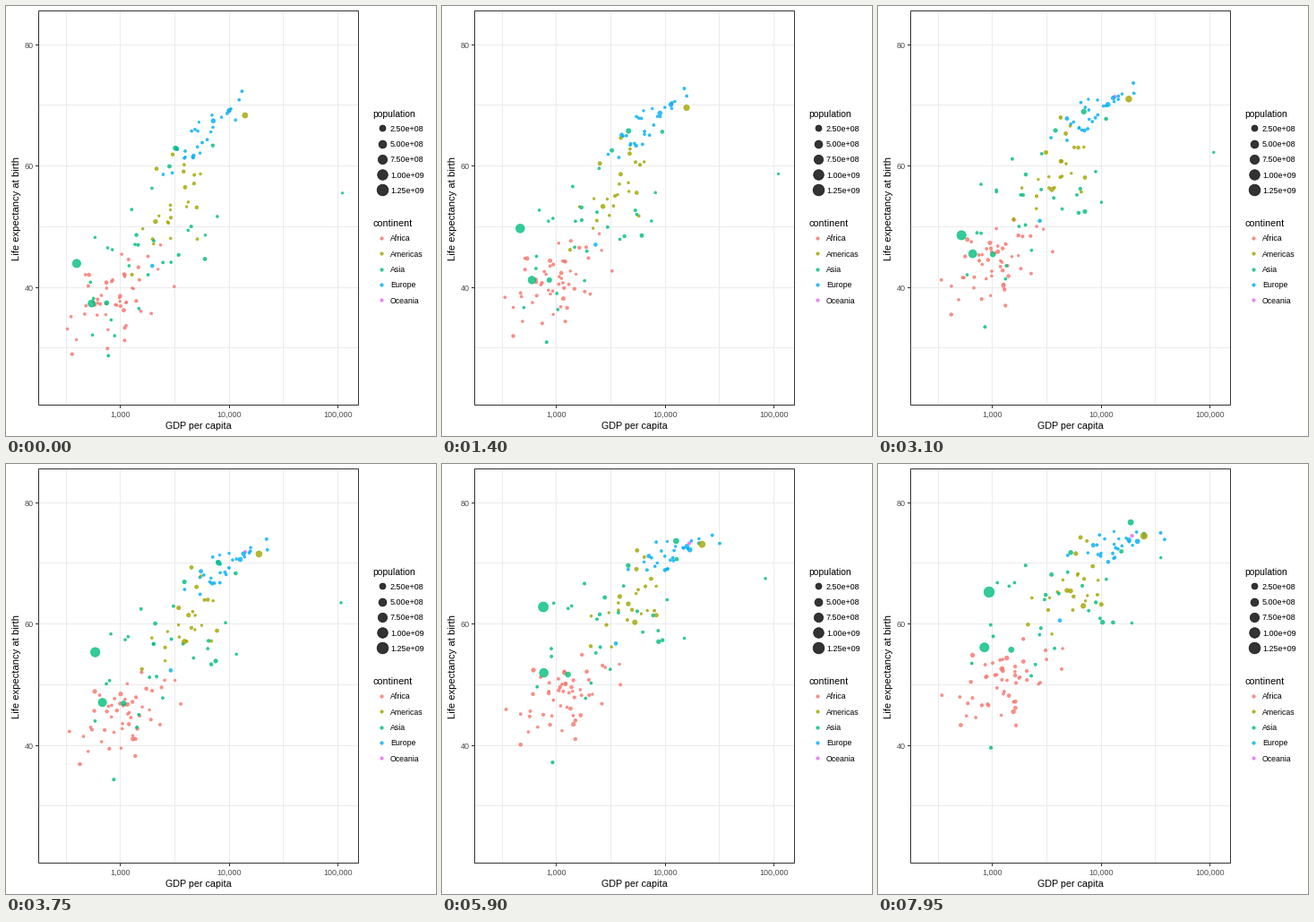
A matplotlib script that plays this animation: 480x480 px, repeating every 8 s.

```python
import numpy as np
import matplotlib.pyplot as plt
from matplotlib.animation import FuncAnimation
from matplotlib.patches import Rectangle

SIZE, DPI = 480, 96
PT = 72 / DPI
FRAMES, STEP = 160, 50
KEYS = np.round(np.arange(7) * 299 / 11)    # one key every five years
PROGRESS = np.linspace(0, 1, len(KEYS))
CEILING = 78                                # life expectancy all groups approach

COLORS = {"Africa": "#F8766D", "Americas": "#A3A500", "Asia": "#00BF7D",
          "Europe": "#00B0F6", "Oceania": "#E76BF3"}

# count, mean log gdp, spread, its gain, mean life, rise per spread, scatter,
# share of the gap to the ceiling that is closed
CROWD = {
    "Africa": (51, 3.02, 0.25, 0.17, 39, 1.2, 4.3, 0.31),
    "Americas": (23, 3.50, 0.20, 0.27, 53, 3.5, 5.0, 0.52),
    "Asia": (27, 3.20, 0.36, 0.36, 46, 4.8, 5.5, 0.50),
    "Europe": (27, 3.74, 0.19, 0.40, 65, 3.2, 1.7, 0.64),
}

# Largest and outlying dots: gdp and life at start and end, millions at start
MAIN = [
    ("Oceania", 10040, 69.1, 19477, 74.7, 9),
    ("Africa", 1077, 36.3, 1577, 45.8, 33),
    ("Americas", 13990, 68.4, 25010, 74.7, 158),
    ("Americas", 2109, 50.9, 7031, 63.3, 57),
    ("Asia", 547, 37.4, 856, 56.6, 372),
    ("Asia", 3217, 63.0, 19384, 77.1, 86),
    ("Asia", 750, 37.5, 1517, 56.2, 82),
    ("Asia", 779, 28.8, 978, 39.9, 8),
    ("Europe", 7144, 67.5, 22032, 73.8, 69),
    ("Europe", 9980, 69.2, 18232, 74.0, 50),
    ("Europe", 1969, 43.6, 4241, 61.0, 22),
]

rng = np.random.default_rng(7)


def path(start, end, bend=0.2):
    """Values at every key, one row per key; bend > 0 rises early."""
    p = PROGRESS + bend * PROGRESS * (1 - PROGRESS)
    return start + np.outer(p, np.subtract(end, start))


def scores(n):
    return np.clip(rng.normal(size=n), -1.9, 1.9)


def growth(continent):
    return 1.2 if continent == "Europe" else 1.9


def crowd(name):
    n, mean, spread, gain, life, rise, scatter, share = CROWD[name]
    u = scores(n)
    x0 = mean + spread * u
    y0 = life + rise * u + scatter * scores(n)
    x1 = x0 + gain + 0.35 * spread * scores(n)
    y1 = y0 + share * (CEILING - y0) + 0.5 * scatter * scores(n)
    x = path(x0, x1) + rng.normal(0, 0.018, (len(KEYS), n))
    y = path(y0, y1, 0.4) + rng.normal(0, 0.25, (len(KEYS), n))
    pop = 4 * np.exp(1.1 * scores(n))
    return x, y, path(pop, pop * growth(name)), [COLORS[name]] * n


def main_dot(name, g0, l0, g1, l1, pop):
    return (path(np.log10([g0]), np.log10([g1])), path([l0], [l1]),
            path([pop], [pop * growth(name)]), [COLORS[name]])


def giant():
    """The most populous dot: an early rise broken by a sharp dip."""
    x = path([2.60], [2.98], 0.1)
    y = path([44.0], [65.5], 0.8)
    x[2] -= 0.05
    y[2] -= 10.5
    return x, y, path([556], [1000], 0), [COLORS["Asia"]]


def oil_state():
    """The richest dot: steady at first, then falling fast."""
    x = 5.04 - 0.54 * PROGRESS[:, None] ** 5
    return x, path([55.6], [71.3]), path([0.2], [1.5]), [COLORS["Asia"]]


def to_px(log_gdp, life):
    return 127.5 + 121.6 * (log_gdp - 3), 314.5 - 6.775 * (life - 40)


def area(size):
    """Marker area in square points for a size in millimetres."""
    return ((0.75 * (2.845 * size + 0.945) - 0.5) * PT) ** 2


def pop_size(millions):
    return 1 + 5 * np.sqrt(np.asarray(millions) / 1319)


fig = plt.figure(figsize=(SIZE / DPI, SIZE / DPI), dpi=DPI, facecolor="white")
ax = fig.add_axes([0, 0, 1, 1])
ax.set_xlim(0, SIZE)
ax.set_ylim(SIZE, 0)
ax.axis("off")


def label(x, y, text, px=9, color="black", ha="left", va="center_baseline", **kw):
    ax.text(x, y, text, fontsize=px * PT, color=color, ha=ha, va=va,
            family="Liberation Sans", **kw)


def line(xs, ys, color):
    ax.plot(xs, ys, color=color, lw=PT, solid_capstyle="butt", zorder=1, snap=False)


def dots(x, y, size, color):
    return ax.scatter(x, y, s=area(size), c=color, edgecolors=color, alpha=0.8,
                      linewidths=0.7 * PT, zorder=3, snap=False)


# Panel
for x in (67.5, 127.5, 188.5, 249.5, 309.5, 370.5):
    line([x, x], [6, 445], "#EBEBEB")
for y in (43.5, 110.5, 178.5, 246.5, 314.5, 381.5):
    line([37, 393], [y, y], "#EBEBEB")
ax.add_patch(Rectangle((36.5, 5.5), 357, 440, fill=False, ec="#333333", lw=PT,
                       zorder=5, snap=False))

for x, text in ((127.5, "1,000"), (249.5, "10,000"), (370.5, "100,000")):
    line([x, x], [446, 449], "#333333")
    label(x, 455, text, color="#4D4D4D", ha="center")
for y, text in ((43.5, "80"), (178.5, "60"), (314.5, "40")):
    line([33, 36], [y, y], "#333333")
    label(31, y, text, color="#4D4D4D", ha="right")
label(215, 468, "GDP per capita", 10.7, ha="center")
label(12.5, 226, "Life expectancy at birth", 11.2, ha="center", va="center", rotation=90)

# Legends
label(409.7, 119.5, "population", 10.4)
for i, text in enumerate(("2.50e+08", "5.00e+08", "7.50e+08", "1.00e+09", "1.25e+09")):
    y = 136.3 + 17.28 * i
    dots(419.5, y, pop_size(250 * (i + 1)), "black")
    label(429, y, text)
label(409.7, 241.5, "continent", 10.7)
for i, (name, color) in enumerate(COLORS.items()):
    y = 259 + 17.28 * i
    dots(418.8, y, 1.5, color)
    label(429, y, name, 8.8)

groups = ([main_dot(*MAIN[0])] + [crowd(name) for name in CROWD]
          + [main_dot(*row) for row in MAIN[1:]] + [giant(), oil_state()])
LOG_GDP, LIFE, POP = (np.hstack(part) for part in list(zip(*groups))[:3])
hues = [color for group in groups for color in group[3]]
cloud = dots(*to_px(LOG_GDP[0], LIFE[0]), pop_size(POP[0]), hues)


def draw(i):
    k = np.searchsorted(KEYS, i, side="right") - 1
    f = (i - KEYS[k]) / (KEYS[k + 1] - KEYS[k])

    def between(a):
        return a[k] + f * (a[k + 1] - a[k])

    cloud.set_offsets(np.column_stack(to_px(between(LOG_GDP), between(LIFE))))
    cloud.set_sizes(area(pop_size(between(POP))))
    return (cloud,)


anim = FuncAnimation(fig, draw, frames=FRAMES, interval=STEP, repeat=True,
                     repeat_delay=0, blit=False)
plt.show()
```
